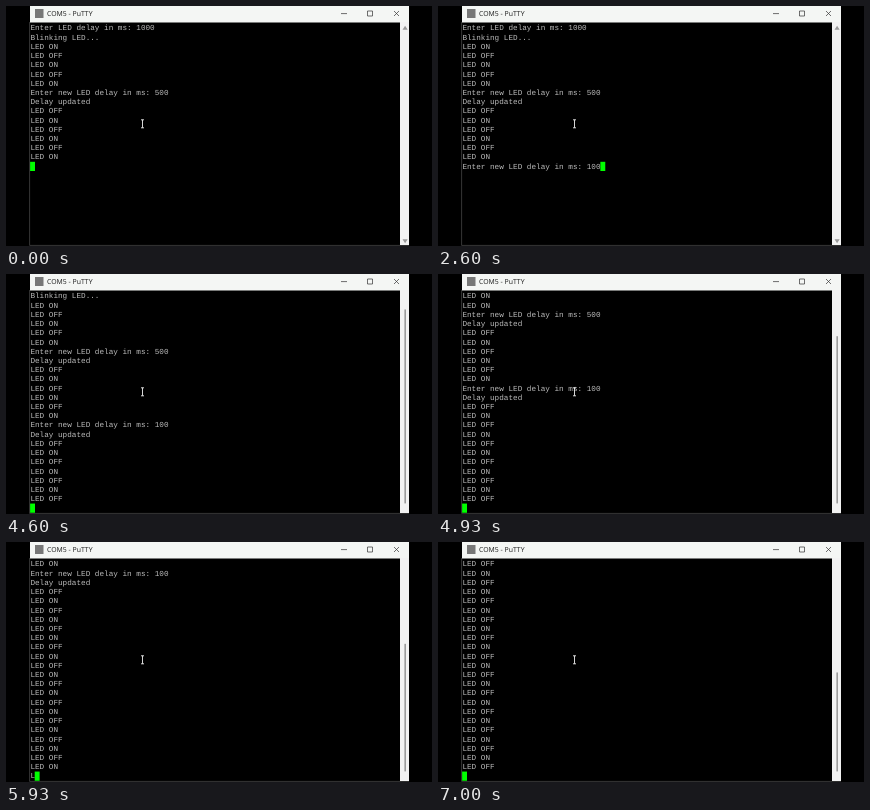
Write an HTML page that moves like this. It is 426x240 px and loops after 7190 ms.

```html
<!DOCTYPE html>
<html lang="en">
<head>
<meta charset="utf-8">
<title>Serial terminal</title>
<style>
html, body { margin: 0; width: 100%; height: 100%; overflow: hidden; background: #000; }
svg { display: block; width: 100vw; height: 100vh; }
text { text-rendering: geometricPrecision; }
#rows { font: 7.68px "Liberation Mono", "Courier New", monospace; fill: #bbb; }
.title { font: 6.9px "Open Sans", "Noto Sans", sans-serif; fill: #1c1c1c; }
.line { fill: none; stroke: #333; stroke-width: .7; }
</style>
</head>
<body>
<svg viewBox="0 0 426 240">
  <rect width="426" height="240"/>
  <path d="M23.6 16V239.4H403" fill="none" stroke="#444" stroke-width=".8"/>
  <g id="rows"></g>
  <rect id="cursor" width="4.9" height="9.2" fill="#0f0"/>
  <rect x="24" width="379" height="16.5" fill="#f4f6f4"/>
  <rect x="394" y="16" width="9" height="223" fill="#f2f2f2"/>
  <rect x="29" y="3" width="8.5" height="9" fill="#777"/>
  <text class="title" x="41" y="10.2">COM5 - PuTTY</text>
  <path class="line" d="M335 7.6h6M361.5 5h5v5h-5zM388 5l5 5M393 5l-5 5"/>
  <path id="arrows" d="M396.5 23.8l2.6-4 2.6 4zM396.5 233.2l2.6 4 2.6-4z" fill="#9a9a9a"/>
  <rect id="thumb" x="398.5" width="1.3" fill="#858585"/>
  <path d="M135 113.8h3M136.5 113.8v8M135 121.8h3" fill="none" stroke="#eee" stroke-width=".9"/>
</svg>
<script>
const LOOP = 7190, FRAME = 1000 / 15;
const ROWS = 24, ROW = 9.22, COL = 4.609, LEFT = 24.4, TOP = 17.4;
const BLINK = { start: 3911, period: 101, print: 8, redraw: 14, count: 31 };
const PROMPT = 'Enter new LED delay in ms: ';
const $ = id => document.getElementById(id);

// LED messages alternate, ending the run with `last`
const leds = (n, first) => Array.from({ length: n }, (_, i) =>
  'LED ' + ((i + first) % 2 ? 'OFF' : 'ON'));

const history = ['Enter LED delay in ms: 1000', 'Blinking LED...', ...leds(5, 0),
  PROMPT + '500', 'Delay updated', ...leds(6, 1)];

const rows = Array.from({ length: ROWS }, (_, i) => {
  const el = document.createElementNS('http://www.w3.org/2000/svg', 'text');
  el.setAttribute('x', LEFT);
  el.setAttribute('y', TOP + ROW * i + 7);
  return $('rows').appendChild(el);
});

// Everything printed by time t; the last entry holds the cursor
function output(t) {
  const lines = [...history];
  if (t < 330) return { lines: [...lines, ''] };
  const typed = [2000, 2330, 2530].filter(key => t >= key).length;
  lines.push(PROMPT + '100'.slice(0, typed));
  if (t < 3530) return { lines };
  lines.push('Delay updated');

  const since = t - BLINK.start;
  const index = Math.floor(since / BLINK.period);
  const phase = since - index * BLINK.period;
  const printing = index >= 0 && index < BLINK.count && phase < BLINK.print;
  const done = Math.max(0, Math.min(BLINK.count, printing ? index : index + 1));
  lines.push(...leds(done, 1), printing ? 'L' : '');
  const stale = !printing && index < BLINK.count && phase < BLINK.redraw;
  return { lines, stale };
}

function draw(now) {
  const t = Math.floor((now % LOOP + 4) / FRAME) * FRAME + 1e-6;
  const { lines, stale } = output(t);
  const scroll = Math.max(0, lines.length - ROWS);
  rows.forEach((row, i) => row.textContent = lines[scroll + i] || '');
  // the top row is repainted last after a scroll
  if (stale && scroll) rows[0].textContent = lines[scroll - 1];

  const last = lines.length - 1;
  $('cursor').setAttribute('x', LEFT - .3 + COL * lines[last].length);
  $('cursor').setAttribute('y', TOP + ROW * (last - scroll) + .1);

  const offset = 202 * scroll / (ROWS + scroll);
  $('thumb').setAttribute('y', 27.4 + offset);
  $('thumb').setAttribute('height', scroll ? 202 - offset : 0);
  $('arrows').style.display = scroll ? 'none' : '';
}

const begin = performance.now();
function tick() {
  draw(performance.now() - begin);
  requestAnimationFrame(tick);
}
tick();
</script>
</body>
</html>
```
